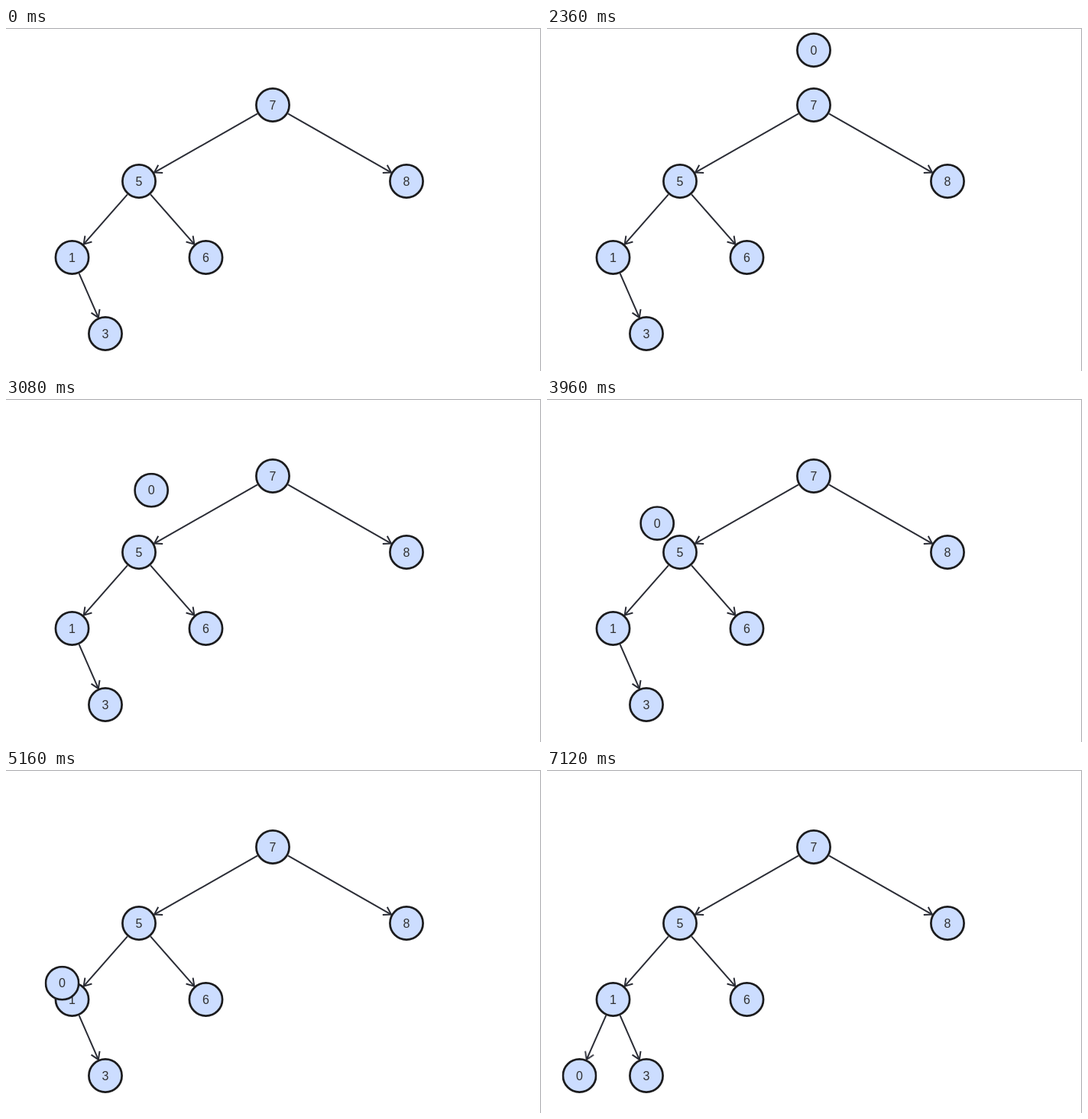
An HTML page that plays this animation: 700 by 450 pixels, repeating every 7.24 s.

```html
<!DOCTYPE html>
<html lang="en">
<head>
<meta charset="utf-8">
<title>Binary search tree insert</title>
<style>
  html, body { margin: 0; width: 100%; height: 100%; overflow: hidden; background: #fff; }
  svg { display: block; width: 700px; height: 450px; }
  text { font-family: "Liberation Sans", Arial, sans-serif; font-size: 16px; fill: #303030; text-anchor: middle; }
  circle { fill: #ccddff; stroke: #1c1c1e; stroke-width: 2.7; }
  .border { fill: none; stroke: #a9a9ad; }
  .edge { fill: none; stroke: #2a2c35; stroke-width: 2; }
  .label rect { fill: #ccddff; stroke: #2a2c35; stroke-width: 1.3; }
  .label text { font-size: 10px; }

  /* One shared 7240 ms timeline */
  .mover, .label, .grow, .grow .shaft, .grow .head { animation: 7240ms linear infinite; }
  .mover { animation-name: travel; }
  .label { animation-name: compare; }
  .grow { animation-name: reveal; }
  .grow .shaft { stroke-dasharray: 1; animation-name: draw; }
  .grow .head { animation-name: push; }

  @keyframes travel {
    0%, 15.45% { transform: translate(349px, 29px); visibility: hidden; }
    15.46%, 32.67% { transform: translate(349px, 29px); visibility: visible; }
    43.56%, 52.25% { transform: translate(174px, 129px); }
    59.46%, 68.45% { transform: translate(86.5px, 229px); }
    78.07%, 100% { transform: translate(42.5px, 401px); visibility: visible; }
  }
  @keyframes compare {
    0%, 24.29% { opacity: 0; }
    24.3%, 32.58% { opacity: 1; }
    32.59%, 43.55% { opacity: 0; }
    43.56%, 52.24% { opacity: 1; }
    52.25%, 59.45% { opacity: 0; }
    59.46%, 68.44% { opacity: 1; }
    68.45%, 100% { opacity: 0; }
  }
  @keyframes reveal {
    0%, 86.6% { opacity: 0; }
    86.61%, 100% { opacity: 1; }
  }
  @keyframes draw {
    0%, 86.6% { stroke-dashoffset: 1; }
    96.55%, 100% { stroke-dashoffset: 0; }
  }
  @keyframes push {
    0%, 86.6% { transform: translateX(-63px); }
    96.55%, 100% { transform: translateX(0); }
  }
</style>
</head>
<body>
<svg id="stage" viewBox="0 0 700 450" xmlns="http://www.w3.org/2000/svg"></svg>
<script>
  const GAP = 23; // distance from a node's centre to its arrow ends

  const pos = {
    7: [349, 101], 5: [174, 201], 8: [524, 201],
    1: [86.5, 301], 6: [261.5, 301], 3: [130, 401], 0: [42.5, 401]
  };
  const edges = [[7, 5], [7, 8], [5, 1], [5, 6], [1, 3], [1, 0]];

  const node = value =>
    `<circle r="21.6"/><text y="5.6">${value}</text>`;

  function edge([from, to]) {
    const [x, y] = pos[from];
    const dx = pos[to][0] - x, dy = pos[to][1] - y;
    const tip = Math.hypot(dx, dy) - GAP;
    const angle = Math.atan2(dy, dx) * 180 / Math.PI;
    return `<g transform="translate(${x} ${y}) rotate(${angle})">
      <g class="edge${to === 0 ? ' grow' : ''}">
        <path class="shaft" pathLength="1" d="M${GAP} 0H${tip}"/>
        <path class="head" d="M${tip - 9.5} -6L${tip} 0L${tip - 9.5} 6"/>
      </g></g>`;
  }

  const fixed = Object.keys(pos).filter(v => v !== '0')
    .map(v => `<g transform="translate(${pos[v]})">${node(v)}</g>`);

  const mover = `<g class="mover">${node(0)}
    <g class="label"><rect x="-7.3" y="29" width="14.4" height="14" rx="3"/>
    <text y="39.5">&lt;</text></g></g>`;

  document.getElementById('stage').innerHTML =
    '<path class="border" d="M0 .5H699.5V450"/>' +
    edges.map(edge).join('') + fixed.join('') + mover;
</script>
</body>
</html>
```
